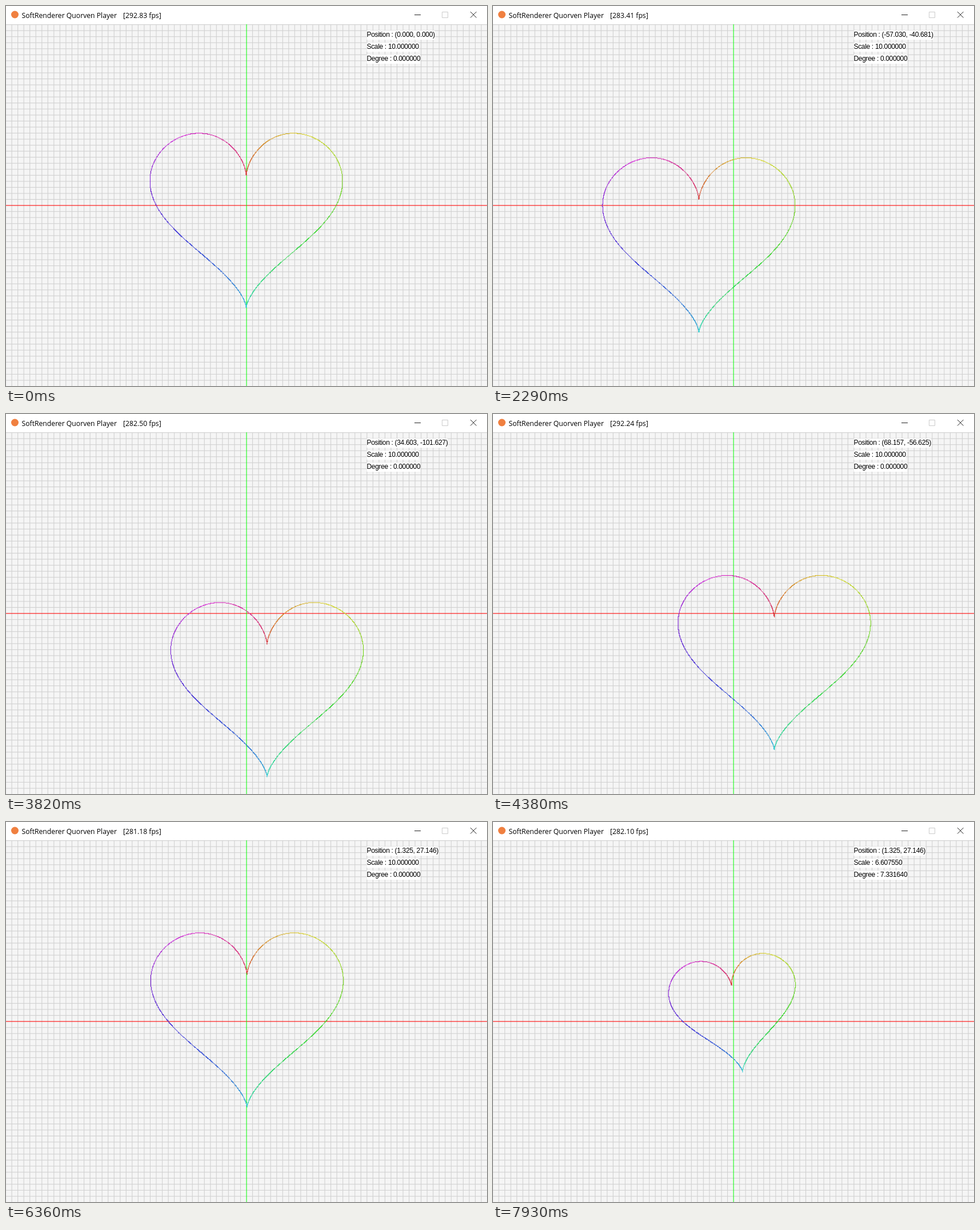
These frames come from a looping animation (842x665 px, 8000 ms). An HTML page with a canvas:

```html
<!DOCTYPE html>
<html lang="en">
<head>
<meta charset="utf-8">
<title>SoftRenderer</title>
<style>
  html, body { margin: 0; width: 100%; height: 100%; overflow: hidden; background: #fff; }
  canvas { display: block; }
</style>
</head>
<body>
<canvas id="stage" width="842" height="665"></canvas>
<script>
const LOOP = 8000, W = 800, H = 600, TAU = 2 * Math.PI;
const SPEED = 0.095; // units per ms
const ctx = document.getElementById('stage').getContext('2d');
const view = Object.assign(document.createElement('canvas'), { width: W, height: H });
const pen = view.getContext('2d');

// Arrow keys and the time each is held down.
const ARROWS = [
  { dx: -1, dy: 0, from: 1317.3, to: 1957.1 },
  { dx: 0, dy: -1, from: 1822.3, to: 3143.6 },
  { dx: 1, dy: 0, from: 2617.3, to: 4259.5 },
  { dx: 0, dy: 1, from: 3678.1, to: 5553.2 },
  { dx: -1, dy: 0, from: 4558.3, to: 5553.2 }
];

const held = (t, from, to) => Math.max(0, Math.min(t, to) - from);

// Two arrows together move diagonally at the same total speed.
function position(t) {
  let x = 0, y = 0;
  for (const key of ARROWS) {
    let time = held(t, key.from, key.to);
    for (const other of ARROWS) {
      if (other === key) continue;
      const overlap = held(t, Math.max(key.from, other.from), Math.min(key.to, other.to));
      time -= overlap * (1 - Math.SQRT1_2);
    }
    x += key.dx * time * SPEED;
    y += key.dy * time * SPEED;
  }
  return [x, y];
}

const scaleAt = t => 10 + 0.022 * held(t, 6790, 7160) - 0.015 * held(t, 7161.17, 7930);
const degreeAt = t => 0.03 * (held(t, 7250, 7694.388) - held(t, 6850, 7050));

function fpsAt(t) {
  const n = Math.floor((t + 273) / 473);
  return 287 + 5.83 * Math.cos(2.1 * n * n);
}

// Each burst of movement refreshes every 70 ms from its start.
function snap(t) {
  const start = [6810, 3890, 1380].find(s => s <= t) ?? 0;
  return start + 70 * Math.floor((t - start) / 70);
}

function rect(color, x, y, w, h) {
  pen.fillStyle = color;
  pen.fillRect(x, y, w, h);
}

function drawGrid() {
  rect('#f5f5f5', 0, 0, W, H);
  for (let x = 0; x < W; x += 10) rect('#d0d0d0', x, 0, 1, H);
  for (let y = 0; y < H; y += 10) rect('#d0d0d0', 0, y, W, 1);
  rect('#f00', 0, H / 2, W, 1);
  rect('#0f0', W / 2, 0, 1, H);
}

function drawHeart(px, py, scale, degree) {
  const c = scale * Math.cos(degree * TAU / 360);
  const s = scale * Math.sin(degree * TAU / 360);
  for (let a = 0; a < TAU; a += 0.003) {
    const x = 16 * Math.sin(a) ** 3;
    const y = 13 * Math.cos(a) - 5 * Math.cos(2 * a) - 2 * Math.cos(3 * a) - Math.cos(4 * a);
    rect(`hsl(${a / TAU * 360}, 80%, 46%)`,
      Math.floor(W / 2 + px + x * c - y * s),
      Math.floor(H / 2 - py - x * s - y * c), 1, 1);
  }
}

function drawLabels(lines) {
  ctx.font = '12px "Liberation Sans", Arial, sans-serif';
  ctx.letterSpacing = '-0.33px';
  lines.forEach((line, i) => {
    const y = 43 + 21 * i;
    ctx.fillStyle = '#fff';
    ctx.fillRect(631.5, y, ctx.measureText(line).width, 16);
    ctx.fillStyle = '#000';
    ctx.fillText(line, 631.5, y + 11);
  });
  ctx.letterSpacing = '0px';
}

function stroke(color, path) {
  ctx.strokeStyle = color;
  ctx.stroke(new Path2D(path));
}

function drawTitleBar(fps) {
  ctx.fillStyle = '#fff';
  ctx.fillRect(0, 0, 842, 32);
  ctx.fillStyle = '#f08040';
  ctx.beginPath();
  ctx.arc(15.5, 15, 6.5, 0, TAU);
  ctx.fill();
  ctx.fillStyle = '#000';
  ctx.font = '12.2px "Open Sans", "Noto Sans", sans-serif';
  ctx.fillText('SoftRenderer Quorven Player', 27.5, 21);
  ctx.fillText(`[${fps.toFixed(2)} fps]`, 205, 21);
  ctx.lineWidth = 1;
  stroke('#222', 'M715 15.5h11');
  stroke('#ccc', 'M763.5 10.5h10v10h-10z');
  stroke('#222', 'M813 10l10.5 10.5M823.5 10l-10.5 10.5');
}

function frame() {
  const now = performance.now() % LOOP, t = snap(now);
  const [x, y] = position(t), scale = scaleAt(t), degree = degreeAt(t);
  drawGrid();
  drawHeart(x, y, scale, degree);
  ctx.drawImage(view, -1, 32, 843, 633);
  drawLabels([
    `Position : (${x.toFixed(3)}, ${y.toFixed(3)})`,
    `Scale : ${scale.toFixed(6)}`,
    `Degree : ${degree.toFixed(6)}`
  ]);
  drawTitleBar(fpsAt(now));
  requestAnimationFrame(frame);
}
frame();
</script>
</body>
</html>
```
